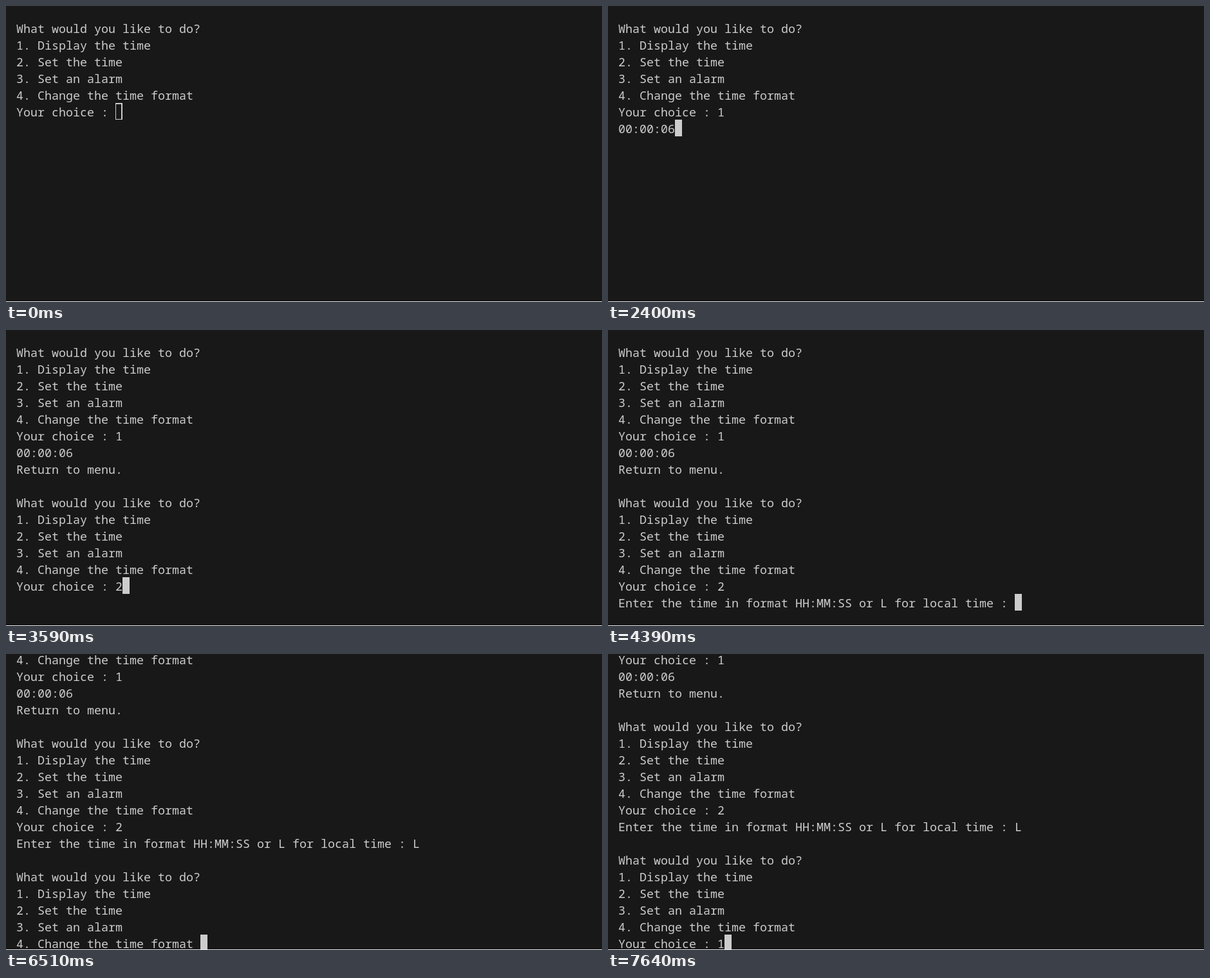
Write an HTML page with a canvas that moves like this. It is 926 px wide and 461 px high and loops after 8000 ms.

```html
<!DOCTYPE html>
<html lang="en">
<head>
<meta charset="utf-8">
<title>Terminal clock</title>
<style>
  html, body { margin: 0; width: 100%; height: 100%; overflow: hidden; background: #181818; }
  canvas { display: block; }
</style>
</head>
<body>
<canvas id="screen" width="926" height="461"></canvas>
<script>
const ctx = document.getElementById('screen').getContext('2d');
const LOOP = 8000;
const LEFT = 16, TOP = 21, CELL = 11, LINE = 26, BASE = 21;
const BG = '#181818', FG = '#cccccc', EDGE = '#e8e8e8';
const FONT = '18.333px "Noto Sans Mono", "DejaVu Sans Mono", monospace';

const menu = [
  'What would you like to do?',
  '1. Display the time',
  '2. Set the time',
  '3. Set an alarm',
  '4. Change the time format '
];
const ask = 'Your choice : ';
const prompt = 'Enter the time in format HH:MM:SS or L for local time : ';

const first = [...menu, ask + '1'];
const second = [...first, '00:00:06', 'Return to menu.', '', ...menu];
const third = [...second, ask + '2', prompt + 'L', '', ...menu];

// Each step: start time, terminal lines, rows scrolled away.
// The cursor always sits after the last character.
const steps = [
  [0, [...menu, ask], 0],
  [1060, first, 0],
  [1390, [...first, '00:00:05'], 0],
  [2400, [...first, '00:00:06'], 0],
  [2860, [...second, ask], 0],
  [3590, [...second, ask + '2'], 0],
  [4320, [...second, ask + '2', ''], 0],
  [4390, [...second, ask + '2', prompt], 0],
  [5650, [...second, ask + '2', prompt + 'L'], 0],
  [6510, third, 5],
  [6580, [...third, ask], 6],
  [7640, [...third, ask + '1'], 6]
];
const FOCUS = 470;

function drawLine(text, y) {
  for (let i = 0; i < text.length; i++) {
    if (text[i] !== ' ') ctx.fillText(text[i], LEFT + i * CELL, y + BASE);
  }
}

function drawCursor(x, y, focused) {
  ctx.fillStyle = FG;
  ctx.fillRect(x, y, CELL, LINE);
  if (focused) return;
  ctx.fillStyle = BG;
  ctx.fillRect(x + 1, y + 2, CELL - 3, LINE - 3);
}

function draw(t) {
  const [, lines, scroll] = steps.filter(s => s[0] <= t).pop();
  const rowY = row => TOP + (row - scroll) * LINE;
  const last = lines.length - 1;

  ctx.fillStyle = BG;
  ctx.fillRect(0, 0, 926, 461);
  ctx.font = FONT;
  ctx.textBaseline = 'alphabetic';
  ctx.fillStyle = FG;
  for (let row = Math.max(0, scroll - 1); row <= last; row++) {
    drawLine(lines[row], rowY(row));
  }
  drawCursor(LEFT + lines[last].length * CELL, rowY(last), t >= FOCUS);

  ctx.fillStyle = EDGE;
  ctx.fillRect(0, 460, 926, 1);
}

const start = performance.now();
function tick() {
  draw((performance.now() - start) % LOOP);
  requestAnimationFrame(tick);
}
tick();
</script>
</body>
</html>
```
